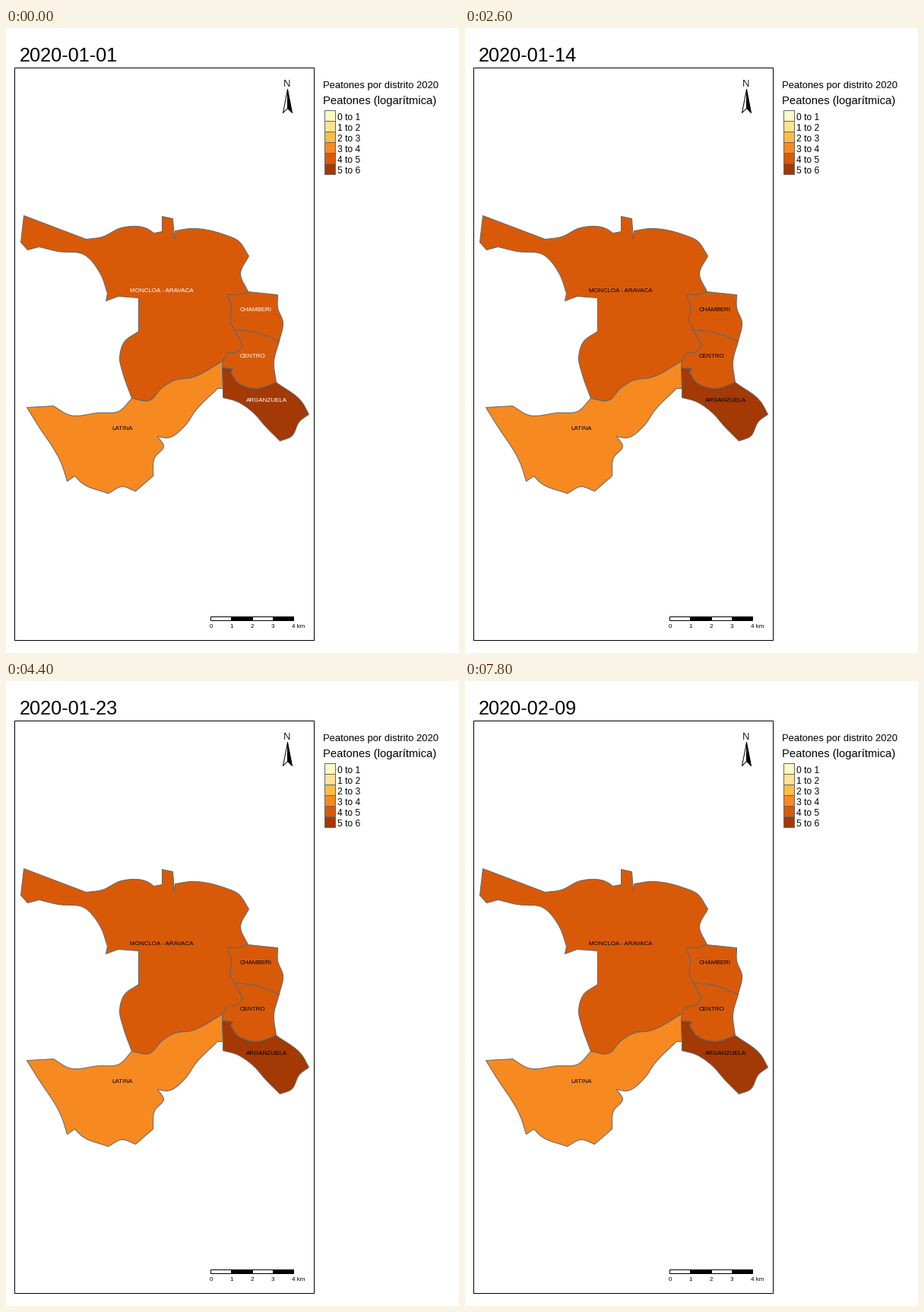
These frames come from a looping animation (596x821 px, 8000 ms). A matplotlib script:

```python
import numpy as np
import matplotlib.pyplot as plt
from matplotlib.animation import FuncAnimation
from matplotlib.patches import Polygon, Rectangle

W, H, DPI = 596, 821, 64
PX = 72 / DPI  # points per pixel
DAYS = 40

RAMP = [plt.get_cmap("YlOrBr")(0.1 + 0.15 * k) for k in range(6)]
BORDER = "#666666"

plt.rcParams["font.family"] = "Liberation Sans"
fig = plt.figure(figsize=(W / DPI, H / DPI), dpi=DPI, facecolor="white")
ax = fig.add_axes([0, 0, 1, 1])
ax.set_xlim(0, W)
ax.set_ylim(H, 0)
ax.axis("off")


def text(x, y, s, size, ha="left", color="black"):
    return ax.text(x, y, s, fontsize=size * PX, ha=ha, va="baseline",
                   color=color, zorder=5)


def poly(points, fill, edge):
    return ax.add_patch(Polygon(np.asarray(points) + 0.5, fc=fill, ec=edge,
                                lw=PX, joinstyle="round", snap=False))


def box(x, y, w, h, fill, edge):
    return ax.add_patch(Rectangle((x + 0.5, y + 0.5), w, h, fc=fill, ec=edge,
                                  lw=PX, snap=False))


def curve(*points, steps=6):
    """Smooth cubic path through a few key points."""
    p = np.array(points, float)
    t = np.append(0, np.cumsum(np.hypot(*np.diff(p, axis=0).T)))
    slope = np.gradient(p, t, axis=0)
    u = np.linspace(0, 1, steps + 1)[:, None]
    out = []
    for i, span in enumerate(np.diff(t)):
        out.append((1 + 2 * u) * (1 - u) ** 2 * p[i]
                   + u * (1 - u) ** 2 * span * slope[i]
                   + u ** 2 * (3 - 2 * u) * p[i + 1]
                   - u ** 2 * (1 - u) * span * slope[i + 1])
    return np.vstack(out)


def join(*parts):
    return np.vstack(parts)


# Corners where three areas meet
north, mid, west, south = (318, 346), (300, 396), (285, 437), (284, 446)
river, park, east, edge = (285, 473), (165, 486), (355, 465), (359, 411)

# Borders shared by two districts
moncloa_chamberi = curve(north, (304, 350), (292, 350), (296, 365), (295, 386), mid)
moncloa_centro = join(mid, curve((311, 416), (302, 426), (291, 427), west))
moncloa_latina = curve(west, (243, 459), (222, 462), (205, 472), (188, 489), park)
chamberi_centro = curve(mid, (330, 400), edge)
centro_arganzuela = join(curve(east, (329, 473), (304, 465), (295, 452)),
                         (298, 447), south)
arganzuela_latina = join(south, river)

moncloa = join(
    curve(park, (153, 452), (149, 434), (155, 412), (174, 398)),
    (174, 354), (147, 352), (131, 358),
    curve((133, 348), (124, 323), (102, 297), (68, 293), (43, 287)),
    (28, 291), (19, 281), (23, 246),
    curve((105, 277), (126, 274), (151, 262), (187, 264), (194, 269)),
    (205, 267), (205, 247), (219, 250), (221, 277),
    curve((222, 266), (242, 263), (287, 271), (305, 279), (319, 299)),
    curve((319, 299), (308, 322), north),
    moncloa_chamberi, moncloa_centro, moncloa_latina)

chamberi = join(moncloa_chamberi, chamberi_centro,
                curve(edge, (364, 386), (357, 367), (357, 350)))

centro = join(chamberi_centro, curve(edge, (352, 438), east),
              centro_arganzuela, moncloa_centro[::-1])

arganzuela = join(
    centro_arganzuela, arganzuela_latina,
    curve((285, 485), (303, 490), (325, 505), (341, 523), (360, 542)),
    curve((360, 542), (375, 536), (386, 516), (398, 507)),
    curve((398, 507), (389, 491), east))

latina = join(
    moncloa_latina[::-1], arganzuela_latina,
    curve((278, 473), (249, 502), (235, 522), (212, 538), (199, 536)),
    curve((199, 536), (207, 549), (195, 564), (193, 588)),
    curve((170, 608), (152, 602), (134, 611)),
    curve((134, 611), (99, 597), (90, 588)),
    curve((80, 595), (73, 573), (40, 519), (27, 498)),
    curve((62, 496), (83, 508), (121, 505), (148, 503), park))

# name, outline, label centre, label baseline, usual class
DISTRICTS = [
    ("MONCLOA - ARAVACA", moncloa, 205, 347, 4),
    ("LATINA", latina, 153.5, 528, 3),
    ("CHAMBERI", chamberi, 329, 372, 4),
    ("CENTRO", centro, 324, 433, 4),
    ("ARGANZUELA", arganzuela, 343, 491, 5),
]
# Days on which a district drops one class
QUIET = {"CENTRO": {20, *range(27, 31), 37}, "LATINA": {20}}

shapes, labels = {}, {}
for name, outline, x, y, level in DISTRICTS:
    shapes[name] = poly(outline, RAMP[level], BORDER)
    labels[name] = text(x, y, name, 8, "center")

# Map frame and title
box(11, 52, 394, 752, "none", "black")
title = text(18, 44, "", 25.3)

# Legend
text(417, 79, "Peatones por distrito 2020", 13)
text(417, 100, "Peatones (logarítmica)", 14.7)
for k, shade in enumerate(RAMP):
    box(419, 108 + 14 * k, 14, 14, shade, BORDER)
    text(436, 121 + 14 * k, f"{k} to {k + 1}", 12)

# North arrow
text(369.5, 77, "N", 13, "center", "#1C0A30")
for side, fill in ((-6, "white"), (6, "black")):
    poly([(370, 80), (370 + side, 111), (370, 105)], fill, "black")

# Scale bar
for k in range(4):
    box(round(269 + 27.25 * k), 773, 27, 5, "black" if k % 2 else "white", "black")
    text(269.5 + 27.1 * k, 788, str(k), 8, "center")
text(375.7, 788, "4 km", 8)


def draw(day):
    month, date = (1, day + 1) if day < 31 else (2, day - 30)
    title.set_text(f"2020-{month:02d}-{date:02d}")
    for name, _, _, _, usual in DISTRICTS:
        level = usual - (day in QUIET.get(name, ()))
        shapes[name].set_facecolor(RAMP[level])
        labels[name].set_color("white" if day == 0 and level > 3 else "black")
    return [title, *shapes.values(), *labels.values()]


anim = FuncAnimation(fig, draw, frames=DAYS, init_func=lambda: draw(0),
                     interval=200, repeat=True, repeat_delay=0, blit=False)
plt.show()
```
